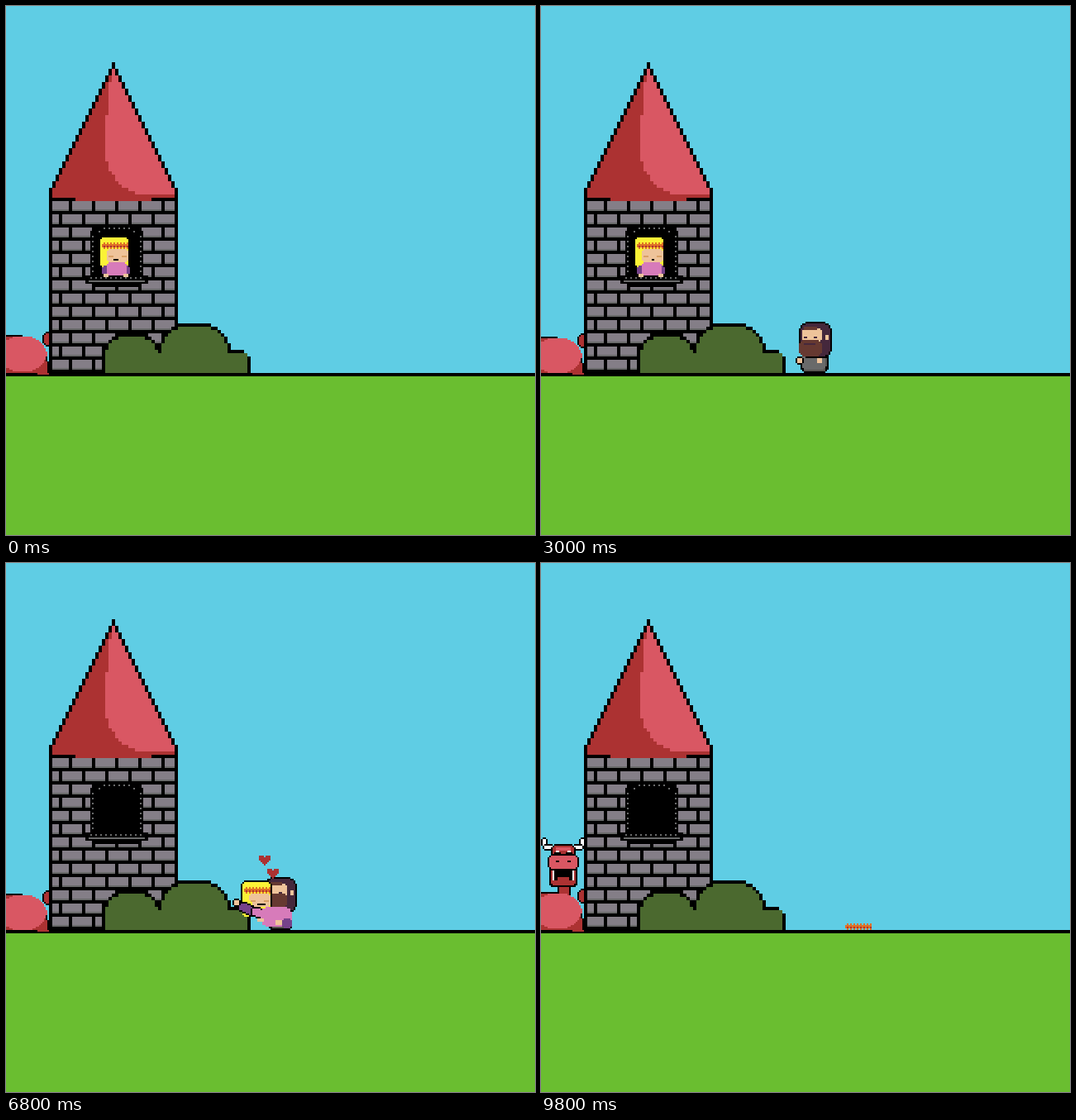
Animation, 640 px wide and 640 px high, one loop 10000 ms. Source, as an HTML page with a canvas:

```html
<!DOCTYPE html>
<html lang="en">
<head>
<meta charset="utf-8">
<title>Tower rescue</title>
<style>
html, body { margin: 0; width: 100%; height: 100%; overflow: hidden; background: #5fcde4; }
canvas { display: block; width: 640px; height: 640px; image-rendering: pixelated; }
</style>
</head>
<body>
<canvas id="stage" width="640" height="640"></canvas>
<script>
const ctx = document.getElementById('stage').getContext('2d');
const STEP = 200, LOOP = 10000, GROUND = 444;
const C = {
  black: '#000', sky: '#5fcde4', grass: '#6abe30', bush: '#4b692f',
  red: '#d95763', dark: '#ac3232', stone: '#847e87', shade: '#696a6a', iron: '#595652',
  hair: '#45283c', beard: '#663931', skin: '#eec39a', tan: '#d9a066',
  gold: '#fbf236', orange: '#df7126', pink: '#d77bba', purple: '#76428a', white: '#fff'
};

function box(color, x, y, w, h) {
  ctx.fillStyle = color;
  ctx.fillRect(x, y, w, h);
}

// A rounded block built from rows of cells.
function blob(color, x, y, w, h, r, cell = 2) {
  for (let i = 0; i < h; i += cell) {
    const depth = Math.min(r, i + cell / 2, h - i - cell / 2);
    const inset = r - Math.sqrt(r * r - (r - depth) ** 2);
    const cut = cell * Math.round(inset / cell);
    box(color, x + cut, y + i, w - 2 * cut, cell);
  }
}

function lined(color, x, y, w, h, r = 2, cell = 2) {
  blob(C.black, x - cell, y - cell, w + 2 * cell, h + 2 * cell, r + cell, cell);
  blob(color, x, y, w, h, r, cell);
}

// A thick outlined stroke of square steps between two points.
function limb(color, x1, y1, x2, y2, size) {
  for (const draw of [lined, blob]) {
    for (let t = 0; t <= 1; t += 0.125) {
      const even = (a, b) => 2 * Math.round((a + (b - a) * t) / 2);
      draw(color, even(x1, x2), even(y1, y2), size, size, size / 4);
    }
  }
}

function at(x, y, draw, flip = 1) {
  ctx.save();
  ctx.translate(x, y);
  ctx.scale(flip, 1);
  draw();
  ctx.restore();
}

function mirrored(axis, draw) {
  draw();
  at(2 * axis, 0, draw, -1);
}

function drawBricks() {
  box(C.black, 52, 220, 156, 224);
  for (let r = 0; r < 13; r++) {
    const top = 236 + r * 16;
    for (let joint = r % 2 ? 36 : 48; joint < 204; joint += 28) {
      const left = Math.max(56, joint + 4), right = Math.min(204, joint + 28);
      box(C.stone, left, top, right - left, 12);
      box(C.shade, left, top + 10, right - left, 2);
    }
  }
}

function drawRoof() {
  const apex = 68, middle = 128;
  for (let y = apex; y < 236; y += 4) {
    const half = Math.min(76, 4 * Math.floor((y - apex) / 8));
    const left = middle - half + 4, right = middle + half;
    box(C.black, left - 4, y, right - left + 8, 4);
    if (right <= left) continue;
    const taper = y < 232 ? 0 : 28;
    box(C.dark, left + taper, y, right - left - 2 * taper, 4);
    if (y >= 228) continue;
    const u = Math.max(0, (y - 172) / 56);
    const edge = middle - Math.min(8, 4 * Math.floor((y - 52) / 40));
    const glow = Math.max(left, edge + 4 * Math.round(14 * (1 - Math.sqrt(1 - u * u))));
    box(C.red, glow, y, right - glow, 4);
  }
}

function drawWindow() {
  blob(C.black, 102, 264, 64, 70, 12);
  for (let i = 0; i < 8; i++) {
    const corner = i % 7 ? 0 : 4;
    box(C.shade, 112 + i * 6, 268 + corner, 2, 2);
  }
  mirrored(134, () => {
    for (let y = 278; y < 328; y += 6) box(C.shade, 104, y, 2, 2);
  });
  box(C.black, 96, 326, 76, 10);
  box(C.shade, 100, 332, 68, 2);
  for (let x = 102; x < 166; x += 6) box(C.shade, x, 328, 2, 2);
  box(C.black, 104, 336, 60, 4);
}

function drawBush() {
  lined(C.bush, 264, 420, 28, 48, 12, 4);
  lined(C.bush, 120, 400, 64, 68, 24, 4);
  lined(C.bush, 188, 388, 80, 80, 32, 4);
  box(C.bush, 120, 420, 172, 24);
}

function drawDragonHead(roar, shocked) {
  mirrored(27, () => {
    lined(C.white, 2, 334, 4, 8);
    lined(C.white, 4, 342, 10, 4);
  });
  box(C.black, 20, 386, 16, 18);
  box(C.dark, 22, 386, 12, 18);
  lined(C.dark, 14, 342, 26, 16, 6);
  box(C.red, 18, 344, 18, 4);
  lined(C.dark, 12, 368, 30, 22, 4);
  lined(C.red, 10, 354, 34, 16, 6);
  box(C.black, 14, 372, 26, roar ? 12 : 4);
  mirrored(27, () => {
    box(C.black, 16, 350, 8, 2);
    if (shocked) box(C.white, 18, 348, 4, 2);
    box(C.black, 18, 360, 4, 2);
    if (roar) box(C.white, 14, 372, 2, 12);
  });
  if (roar) box(C.dark, 20, 380, 14, 4);
}

function drawDragon(s) {
  if (s >= 35) {
    const lift = s >= 45 ? 0 : Math.max(4, 52 - (s - 35) * 12);
    at(0, lift, () => drawDragonHead(s >= 45, s >= 40));
  }
  const breath = s < 36 && Math.floor(s / 2) % 2 ? 2 : 0;
  at(0, breath, () => {
    lined(C.dark, 46, 396, 12, 14, 6);
    lined(C.dark, -32, 400, 82, 80, 38);
    blob(C.red, -10, 400, 60, 42, 26);
  });
}

function drawCrown(x, y, turned) {
  at(x, y, () => {
    if (turned) ctx.rotate(-Math.PI / 2);
    box(C.orange, -16, -2, 32, 4);
    for (let i = -14; i < 16; i += 4) {
      box(C.orange, i, -4, 2, 8);
      box(C.dark, i, 0, 2, 2);
    }
  });
}

function drawHand(x, y) {
  lined(C.skin, x, y, 6, 6);
}

function drawPrincessHead(x, y, mouth, crowned = true) {
  at(x, y, () => {
    lined(C.gold, 0, 0, 34, 36, 6);
    blob(C.skin, 8, 14, 26, 16, 4);
    box(C.tan, 10, 22, 6, 2);
    box(C.tan, 26, 22, 6, 2);
    box(C.black, mouth.x, 26, mouth.w, mouth.h);
    if (crowned) drawCrown(18, 10);
  });
}

const isChatting = s => s >= 16 && s < 20 && s % 2 === 0;

function drawWindowPrincess(s) {
  const open = isChatting(s) || s >= 22;
  drawPrincessHead(114, 280, { x: s < 4 ? 16 : 20, w: s < 4 ? 6 : 3, h: open ? 4 : 2 });
  blob(C.purple, 116, 314, 34, 12, 6);
  blob(C.pink, 122, 310, 24, 16, 6);
  mirrored(133, () => box(C.skin, 118, 324, 6, 4));
}

function drawFlyingPrincess() {
  mirrored(243, () => {
    limb(C.purple, 218, 308, 226, 314, 8);
    drawHand(214, 306);
  });
  lined(C.pink, 220, 316, 38, 32, 14);
  drawPrincessHead(224, 280, { x: 18, w: 8, h: 4 });
  blob(C.pink, 230, 310, 26, 20, 8);
}

function drawKnightHead() {
  lined(C.hair, 314, 384, 36, 40, 10);
  blob(C.skin, 316, 390, 24, 16, 4);
  box(C.beard, 318, 388, 16, 4);
  box(C.hair, 318, 400, 4, 2);
  box(C.hair, 330, 400, 4, 2);
  box(C.skin, 344, 398, 4, 6);
}

function drawKnight(cheer, hop) {
  lined(C.iron, 316, 424, 30, 16, 4);
  if (hop) mirrored(331, () => lined(C.iron, 320, 436, 8, 8, 4));
  else lined(C.iron, cheer ? 312 : 318, 436, cheer ? 36 : 26, 6);
  blob(C.shade, 316, 422, 28, 18, 4);
  drawKnightHead();
  blob(C.beard, 312, 404, 28, 20, 8);
  if (cheer) {
    box(C.black, 316, 404, 14, 10);
    box(C.white, 318, 406, 10, 4);
    limb(C.shade, 306, 424, 314, 426, 6);
  } else {
    box(C.hair, 318, 408, 14, 2);
  }
  drawHand(cheer ? 304 : 310, cheer ? 418 : 426);
  box(C.skin, 334, 426, 6, 6);
}

function drawCouple(crowned) {
  lined(C.iron, 320, 432, 24, 10, 4);
  at(0, -2, drawKnightHead);
  blob(C.beard, 318, 400, 22, 16, 6);
  drawPrincessHead(286, 386, { x: 18, w: 10, h: 2 }, crowned);
  blob(C.gold, 286, 408, 12, 20, 4);
  limb(C.purple, 282, 412, 296, 418, 8);
  drawHand(276, 408);
  limb(C.pink, 298, 418, 316, 424, 8);
  blob(C.pink, 308, 416, 38, 24, 10);
  blob(C.purple, 334, 430, 12, 12, 4);
  box(C.skin, 304, 430, 8, 4);
  box(C.skin, 326, 432, 8, 6);
}

function drawHeart(x, y) {
  for (let i = 0; i < 6; i++) {
    const inset = Math.max(0, 2 * (i - 2));
    box(C.dark, x + inset, y + 2 * i, 14 - 2 * inset, 2);
  }
  ctx.clearRect(x + 6, y, 2, 2);
  box(C.sky, x + 6, y, 2, 2);
}

function drawHearts(age) {
  for (let slot = 0; slot < 3; slot++) {
    if (age >= slot && (age - slot) % 3 < 2) drawHeart(slot % 2 ? 306 : 316, 370 - slot * 16);
  }
}

function drawActors(s) {
  if (s < 24) drawWindowPrincess(s);
  if (s >= 4 && s < 32) {
    const distance = 2 * Math.round(Math.max(0, (14 - s) * 100 / 3) / 2);
    const hop = distance ? (s % 2 ? -12 : -4) : 0;
    at(distance, hop, () => drawKnight(s >= 22 || isChatting(s), hop));
  }
  if (s >= 24 && s < 32) at((s - 28) * 18, 5 * (s - 26) ** 2 - 20, drawFlyingPrincess);
  if (s >= 32 && s < 43) drawCouple(true);
  if (s >= 33 && s < 40) drawHearts(s - 33);
  if (s >= 43) {
    const k = Math.max(0, s - 44);
    at(658 + 68 * k, 4 * k * k - 50 * k, () => drawCouple(s < 45), -1);
  }
  if (s >= 45) {
    const k = s - 45;
    drawCrown(394 - Math.min(10, k * 4), 344 - 36 * k + 15 * k * k, k % 2 === 0 && k < 4);
  }
}

function draw(s) {
  box(C.sky, 0, 0, 640, 640);
  drawDragon(s);
  drawBricks();
  drawRoof();
  drawWindow();
  drawBush();
  box(C.grass, 0, GROUND + 4, 640, 192);
  box(C.black, 0, GROUND, 640, 4);
  box(C.dark, 38, GROUND, 14, 2);
  drawActors(s);
}

let shown = -1;
function tick() {
  const s = Math.floor(performance.now() % LOOP / STEP);
  if (s !== shown) draw(shown = s);
  requestAnimationFrame(tick);
}
tick();
</script>
</body>
</html>
```
